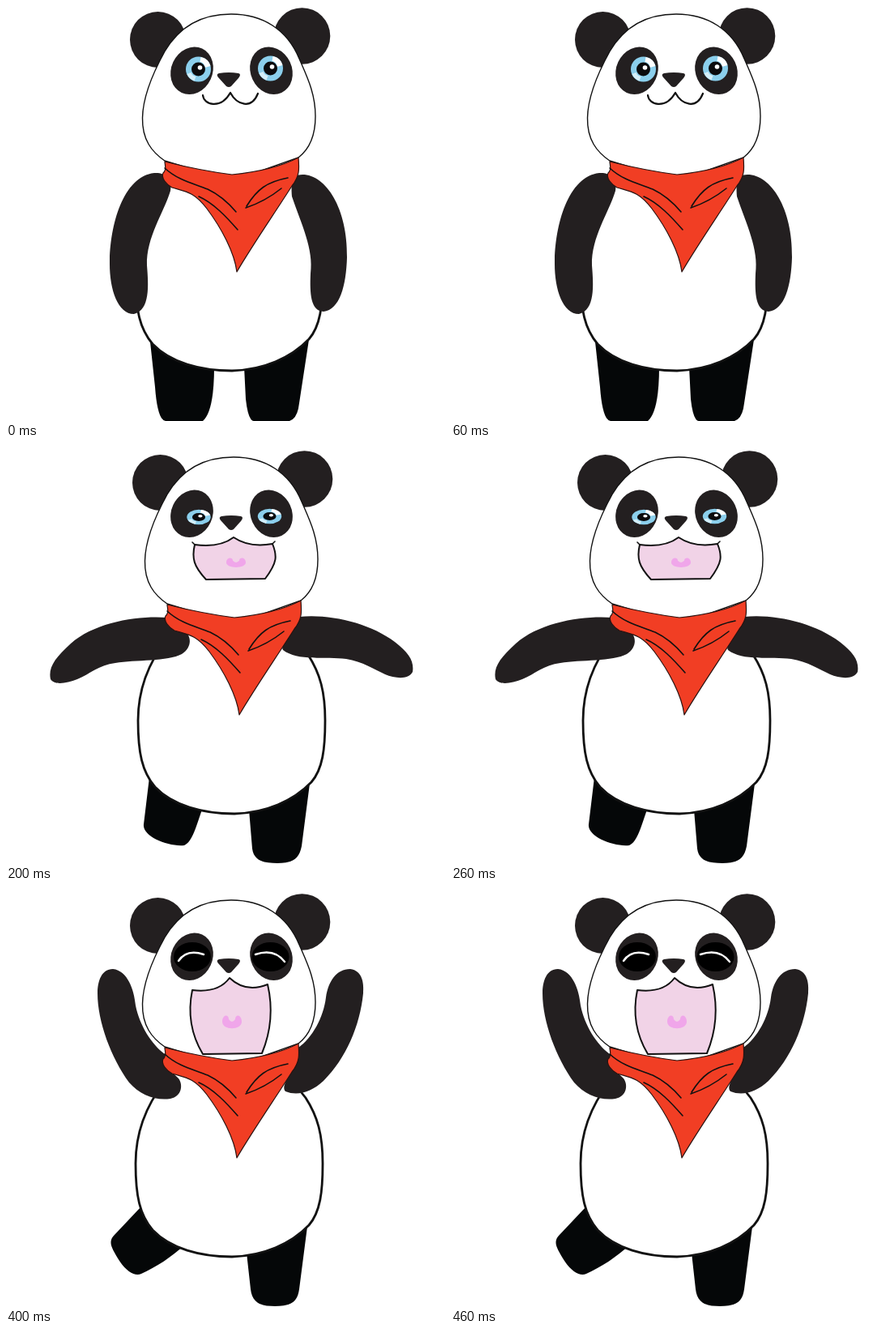
Recreate the animation shown at these times as an HTML page. Size 542 by 512 pixels, loop 0.5 s.

```html
<!DOCTYPE html>
<html lang="en">
<head>
<meta charset="utf-8">
<title>Jumping panda</title>
<style>
  html, body { margin: 0; width: 100%; height: 100%; overflow: hidden; background: #fff; }
  svg { display: block; width: 100%; height: 100%; }

  /* One pose is visible for a fifth of the loop. */
  .pose { visibility: hidden; animation: show 500ms step-end infinite; animation-delay: calc(var(--i) * 100ms - 500ms); }
  @keyframes show { 0% { visibility: visible; } 20%, 100% { visibility: hidden; } }

  /* The trunk and head sway to the right in the middle of the jump. */
  .sway { animation: sway 500ms step-end infinite -500ms; }
  @keyframes sway { 0% { transform: none; } 40% { transform: translateX(3px); } 80%, 100% { transform: none; } }

  .p0 { --i: 0; } .p1 { --i: 1; } .p2 { --i: 2; } .p3 { --i: 3; } .p4 { --i: 4; }
  .fur { fill: #231f20; }
  .leg { fill: #050708; }
  .skin { fill: #fff; stroke: #111; }
  .line { fill: none; stroke: #111; stroke-width: 2.2; stroke-linecap: round; stroke-linejoin: round; }
  .fold { stroke-width: 1.6; }
  .mouth { fill: #f1d3e7; stroke: #111; stroke-width: 2; stroke-linejoin: round; }
  .thin { stroke-width: 1.5; }
  .tongue { fill: #f0a6ea; }
</style>
</head>
<body>
<svg viewBox="0 0 542 512" preserveAspectRatio="none">
  <defs>
    <g id="eye">
      <circle r="15.5" fill="#8bcfec"/>
      <path d="M3-15A15.5 15.5 0 0 1 15-4L8-2Q8-8 2-9Z" fill="#fff"/>
      <path d="M-14 6A15.5 15.5 0 0 0-5 14.5L-3 9Q-8 8-9 4Z" fill="#d5eff9"/>
      <circle r="8.5" fill="#0b0b0d"/>
      <circle cx="2" cy="-2" r="2.8" fill="#fff"/>
    </g>
    <path id="tongue" class="tongue" d="M-12 0C-12-9-4-10-4-3Q0 3 4-3C4-10 12-9 12 0C12 11-12 11-12 0Z"/>
  </defs>

  <g class="leg">
    <path class="pose p0" d="M177 405L184 470Q187 511 197 512H243Q257 500 257 445ZM294 445L296 485Q299 512 306 512H350Q360 509 362 490L375 405Z"/>
    <path class="pose p1" d="M181 410L172 480C171 497 205 509 225 506C235 500 240 475 248 444ZM300 445L304 493C306 508 318 511 335 511C355 511 362 505 365 490L377 405Z"/>
    <path class="pose p2" d="M177 405L170 463C168 478 200 491 220 489C230 485 235 465 243 442ZM300 445L304 493C306 508 318 511 335 511C355 511 362 505 365 490L376 405Z"/>
    <path class="pose p3" d="M170 392L149 436C143 453 180 477 193 476C200 474 212 456 227 435ZM302 445L306 493C308 508 320 511 336 511C356 511 363 505 366 490L378 405Z"/>
    <path class="pose p4" d="M167 388L133 424C126 432 130 439 140 455C150 470 160 474 167 471C185 463 205 450 221 435ZM297 445L302 490C304 508 316 511 332 511C353 511 360 505 362 490L373 405Z"/>
  </g>

  <g class="sway">
    <path class="skin" stroke-width="2.8" d="M196 234C174 262 160 295 160 335C160 375 165 398 181 417C203 440 240 450 279 450C318 449 352 434 374 411C388 395 391 370 391 335C391 300 385 277 370 254L358 239"/>
  </g>

  <g class="fur">
    <path class="pose p0" d="M183 206C196 205 206 213 203 228C195 255 173 285 174 320C176 345 178 375 158 380C138 380 128 350 128 318C128 270 145 210 183 206ZM366 208C395 208 422 250 421 310C420 345 412 375 392 377C376 376 375 355 376 330C380 300 365 270 353 235C352 220 352 208 366 208Z"/>
    <path class="pose p1" d="M193 206C150 208 110 235 85 265C68 288 62 300 64 312C67 322 78 325 88 322C105 317 118 290 135 278C155 266 190 260 208 247C218 238 216 225 213 218L200 207ZM362 206C402 203 437 224 459 245C477 263 490 285 489 302C485 314 472 315 462 309C446 300 436 286 422 275C403 261 375 258 350 243C345 235 352 220 362 206Z"/>
    <path class="pose p2" d="M200 208C165 205 110 213 80 240C60 258 52 270 55 284C60 292 75 289 88 284C103 278 115 266 135 264C160 260 200 262 217 253C228 246 229 235 224 228ZM362 207C400 203 450 215 480 238C498 252 504 262 502 275C497 285 480 283 468 278C455 272 440 262 420 259C395 256 360 262 342 248C338 242 350 225 362 207Z"/>
    <path class="pose p3" d="M202 207C170 187 125 180 90 180.500C65 184 52 190 52 203C53 217 70 222 95 222C115 220 130 228 145 236C165 250 190 264 210 261C223 258 226 245 223 234ZM360 205C385 187 430 174 465 175C490 175 503 183 503 195C502 208 485 213 465 214C440 217 425 222 408 236C390 250 370 260 352 258C342 255 338 248 345 240Z"/>
    <path class="pose p4" d="M196 200C180 188 165 165 160 140C158 120 150 97 132 95C118 95 113 110 113 125C113 160 130 205 152 235C165 250 185 258 203 255C217 252 219 238 213 230C205 222 196 215 196 200ZM361 192C378 180 392 155 395 130C398 110 408 95 425 95C440 97 442 112 441 125C437 165 420 205 392 233C377 247 360 252 345 246C338 238 355 225 361 192Z"/>
  </g>

  <g class="sway">
    <circle class="fur" cx="187.500" cy="41.500" r="34.500"/>
    <circle class="fur" cx="365.500" cy="37" r="34.800"/>
    <path class="skin" stroke-width="1.4" d="M278 10C240 10 213 27 196 56C185 76 169 108 168.500 138C168 165 180 180 196 191L279 216L361 187C374 177 382 160 382 136C382 108 372 88 362 65C347 29 317 10 278 10Z"/>
    <path class="fur" d="M263 83Q275 81 287 83Q291 84 287 89L278 99Q275 101 272 99L262 88Q259 84 263 83Z"/>
    <path fill="#f13e24" stroke="#2a1210" stroke-width="1.2" stroke-linejoin="round" d="M196 192Q240 203 279 208Q330 203 361 187C362 200 363 210 353 222C330 258 303 297 285 328C282 304 266 274 248 250C232 229 222 229 205 224C198 220 191 212 194 206C199 202 196 196 196 192Z"/>
    <path class="line fold" d="M196 200C212 215 232 219 249 226Q268 235 284 254M238 235C256 243 272 260 286 276M348 212C322 217 310 226 297 247M340 225Q320 241 296 249"/>
  </g>

  <ellipse class="fur" rx="25.500" ry="30" transform="translate(229.500 79.800) rotate(25)"/>
  <ellipse class="fur" rx="25.500" ry="30" transform="translate(327.500 79.800) rotate(-25)"/>

  <g class="pose p0">
    <use href="#eye" transform="translate(237.500 78)"/>
    <use href="#eye" transform="translate(326.500 77)"/>
    <path class="line" d="M243 110C244 122 265 128 277 107C285 122 303 128 311 108"/>
  </g>
  <g class="pose p1">
    <use href="#eye" transform="translate(236 81) scale(.84 .77)"/>
    <use href="#eye" transform="translate(325 80.500) scale(.84 .77)"/>
    <path class="mouth thin" d="M232 121Q263 122 278 112Q296 122 326 119C333 130 331 135 325 139Q319 148 314 148H247Q241 147 234 140C227 135 227 130 232 121Z"/>
    <use href="#tongue" transform="translate(281.500 134.500) scale(1 .5)"/>
  </g>
  <g class="pose p2">
    <use href="#eye" transform="translate(238 84) scale(.95 .6)"/>
    <use href="#eye" transform="translate(325.500 83) scale(.95 .6)"/>
    <path class="mouth" d="M233 118Q264 122 281 109Q300 122 329 117C335 132 335 140 320 160L247 161C232 145 229 135 233 118Z"/>
    <path class="line fold" d="M230 115L233 118M329 117L332 114"/>
    <use href="#tongue" transform="translate(284 140) scale(1 .72)"/>
  </g>
  <g class="pose p3">
    <use href="#eye" transform="translate(234 87) scale(.84 .38)"/>
    <use href="#eye" transform="translate(325 86) scale(.84 .38)"/>
    <path class="mouth" d="M234 118Q264 125 281 106Q302 125 329 116C336 140 332 165 322 184L247 185C234 165 227 140 234 118Z"/>
    <path class="line fold" d="M231 115L234 118M329 116L331 114"/>
    <use href="#tongue" transform="translate(284 153)"/>
  </g>
  <g class="pose p4">
    <ellipse cx="230" cy="80" rx="23" ry="18"/>
    <ellipse cx="326.500" cy="80" rx="23" ry="18"/>
    <path fill="none" stroke="#fff" stroke-width="2.400" stroke-linecap="round" d="M213 85Q223 70 244 77M308 77Q331 69 344 86"/>
    <path class="mouth" d="M230 121Q262 125 276 106Q296 125 323 114C329 140 328 170 316 199L243 200C228 175 224 150 230 121Z"/>
    <use href="#tongue" transform="translate(279 160)"/>
  </g>
</svg>
</body>
</html>
```
